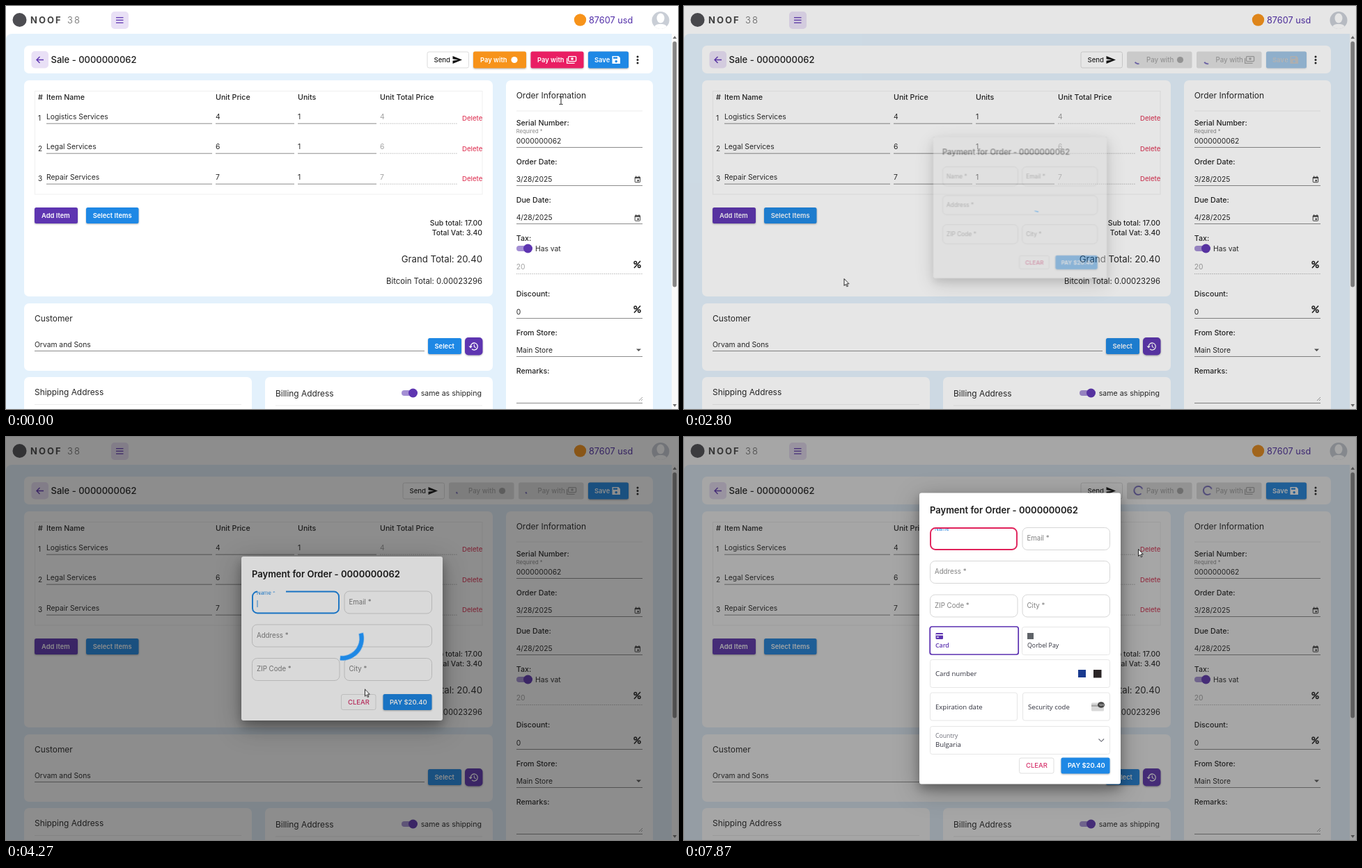
Animation of 965 by 580 pixels, one loop 8 s. Source, as an HTML page:

```html
<!DOCTYPE html>
<html lang="en">
<head>
<meta charset="utf-8">
<title>Sale payment</title>
<style>
:root { --t: 0ms; }
html, body { margin: 0; width: 100%; height: 100%; overflow: hidden; background: #fff; }
svg { display: block; width: 965px; height: 580px; font-family: Inter, sans-serif; }
text { white-space: pre; }
.stripe { font-family: "Open Sans", sans-serif; }
.raised { filter: drop-shadow(0 1px 1px rgba(0,0,0,.3)); }
.modal { filter: drop-shadow(0 7px 7px rgba(0,0,0,.25)) drop-shadow(0 8px 17px rgba(0,0,0,.3)); }
.spin { animation: spin 1.4s linear calc(var(--t) - var(--o)) infinite paused; }
.dash { animation: dash 1.4s ease-in-out calc(var(--t) - var(--o)) infinite paused; }
.save { animation: save 8s linear var(--t) infinite paused; }
.dim { animation: dim 8s linear var(--t) infinite paused; }
.open { animation: open 8s linear var(--t) infinite paused; transform-origin: 482.5px 290px; }
.cursor { animation: move 8s linear var(--t) infinite paused; }
@keyframes spin { to { transform: rotate(360deg); } }
@keyframes dash {
  0% { stroke-dasharray: 1px, 200px; stroke-dashoffset: 0; }
  50% { stroke-dasharray: 100px, 200px; stroke-dashoffset: -15px; }
  100% { stroke-dasharray: 100px, 200px; stroke-dashoffset: -125px; }
}
@keyframes save {
  0%, 13.2% { opacity: 1; }
  13.3%, 33.3% { opacity: 0; }
  38.3%, 100% { opacity: 1; }
}
@keyframes dim {
  0%, 33.3% { opacity: 0; }
  35% { opacity: .28; }
  38.3%, 100% { opacity: 1; }
}
@keyframes open {
  0%, 33.3% { opacity: 0; transform: scale(.8); }
  35% { opacity: .45; transform: scale(.862); }
  38.3%, 100% { opacity: 1; transform: none; }
}
@keyframes move {
  0% { transform: translate(797px, 136px); }
  1.667% { transform: translate(798px, 121.5px); }
  3.333% { transform: translate(786px, 98px); }
  5%, 26.667% { transform: translate(778px, 87px); }
  28.333% { transform: translate(650px, 145px); }
  30% { transform: translate(420px, 245px); }
  31.667% { transform: translate(234px, 323px); }
  33.333% { transform: translate(230px, 385px); }
  35% { transform: translate(229.5px, 392px); }
  38.333%, 46.667% { transform: translate(231px, 394px); }
  51.667% { transform: translate(450px, 383px); }
  55% { transform: translate(580px, 342px); }
  56.667%, 65% { transform: translate(598.5px, 333px); }
  70% { transform: translate(407px, 472px); }
  75% { transform: translate(426px, 549px); }
  76.667%, 78.333% { transform: translate(427.5px, 551px); }
  80% { transform: translate(480px, 499px); }
  85% { transform: translate(612px, 187px); }
  90%, 95% { transform: translate(648px, 154px); }
  96.667%, 100% { transform: translate(652px, 161px); }
}
</style>
</head>
<body>
<svg id="stage" viewBox="0 0 965 580"></svg>
<script>
const INK = '#262626', GREY = '#a2a2a2', BLUE = '#1e88e5', PURPLE = '#5e35b1', PINK = '#e91e63';
const OFF = '#e0e0e0', LINE = '#8c8c8c';

// y is the middle of the text line
const text = (x, y, size, str, fill = INK, weight = 400, more = '') =>
  `<text x="${x}" y="${y + size * .36}" font-size="${size}" fill="${fill}" font-weight="${weight}" ${more}>${str}</text>`;
const endText = (y, size, str, weight) => text(684, y, size, str, INK, weight, 'text-anchor="end"');
const rect = (x, y, w, h, fill, r = 0, more = '') =>
  `<rect x="${x}" y="${y}" width="${w}" height="${h}" rx="${r}" fill="${fill}" ${more}/>`;
const frame = (x, y, w, h, stroke, r = 0, width = 1) =>
  rect(x, y, w, h, 'none', r, `stroke="${stroke}" stroke-width="${width}"`);
const path = (d, stroke, width = 1, fill = 'none', more = '') =>
  `<path d="${d}" stroke="${stroke}" stroke-width="${width}" fill="${fill}" ${more}/>`;
const dot = (x, y, r, fill) => `<circle cx="${x}" cy="${y}" r="${r}" fill="${fill}"/>`;
const rule = (x1, x2, y, color = LINE, more = '') => path(`M${x1} ${y}H${x2}`, color, 1, 'none', more);
const dotted = (x1, x2, y) => rule(x1, x2, y, '#b5b5b5', 'stroke-dasharray="1.4 1.4"');
const during = (from, to, body) => `<g data-from="${from}" data-to="${to}">${body}</g>`;
const button = (x, y, w, h, fill, label, tx, color = '#fff') =>
  rect(x, y, w, h, fill, 2.5, fill === OFF ? '' : 'class="raised"') + text(tx, y + h / 2, 9.4, label, color, fill === OFF ? 500 : 600);
const card = (x, y, w, h) => rect(x, y, w, h, '#fff', 7);

const spinner = (x, y, size, color, width, base, offset) =>
  `<g transform="translate(${x} ${y}) scale(${size / 44}) rotate(${base})" style="--o:${offset}ms">
   <g class="spin"><circle class="dash" r="20" fill="none" stroke="${color}" stroke-width="${width}"/></g></g>`;
const bigSpinner = (x, y, base, offset) => spinner(x, y, 62.2, BLUE, 4.6, base, offset);

const toggle = (x, y, track = '#a48fd4', knob = PURPLE) =>
  rect(x, y - 4, 20, 8, track, 4) + dot(x + 16.5, y, 6.5, knob);
const plane = x => path(`M${x} 72l13.5 5.5-13.5 5.5v-4.2l8-1.3-8-1.3z`, 'none', 0, '#111');
const notes = (x, c) => frame(x + 2.6, 72.6, 11, 7, c, 1, 1.3) + dot(x + 8, 76, 1.8, c) + path(`M${x + .6} 75v7.4h11`, c, 1.3);
const floppy = c => path('M870.5 72h9l2.5 2.5v8.5h-11.5z', 'none', 0, c) +
  rect(872, 73.4, 6, 2.4, c === '#fff' ? BLUE : OFF) + dot(876.2, 79.7, 1.8, c === '#fff' ? BLUE : OFF);
const percent = y => path(`M902 ${y + 5}l9-10`, '#222', 1.6) +
  [[903.8, -2.6], [909.3, 2.6]].map(([x, d]) => `<circle cx="${x}" cy="${y + d}" r="1.8" fill="none" stroke="#222" stroke-width="1.5"/>`).join('');
const calendar = y => frame(903.2, y - 3.2, 7.4, 7.4, '#444', .8) + rect(903, y - 3.5, 8, 2.2, '#444') +
  rect(906.5, y + .5, 2.4, 2.4, '#444') + path(`M904.7 ${y - 5}v2M909 ${y - 5}v2`, '#444');

function header() {
  return rect(0, 0, 965, 580, '#fff') +
    dot(19.5, 20, 10, '#4d4d52') +
    text(35, 20, 13, 'NOOF', '#444', 700, 'letter-spacing="2"') + text(88, 20, 13, '38', '#666', 300, 'letter-spacing="2"') +
    rect(151, 8, 25, 25, '#e9e0f6', 5) + path('M158 16.7h10.5M158 20.4h10.5M158 24.1h10.5', PURPLE, 1.3) +
    dot(824.5, 20, 8.7, '#f7931a') + text(837, 20, 12.7, '87607 usd', '#512da8') +
    `<clipPath id="face"><circle cx="940" cy="20.5" r="12.5"/></clipPath><g clip-path="url(#face)">` +
    rect(927, 8, 26, 26, '#c9ced6') + `<ellipse cx="940" cy="17.5" rx="5.5" ry="7" fill="#fff"/>` +
    path('M930 34c0-6 4-8 10-8s10 2 10 8z', 'none', 0, '#fff') + '</g>';
}

function scrollbar() {
  return rect(956, 40, 9, 540, '#fafafa') + rect(957.3, 51, 5.8, 353.5, '#868686', 2.9) +
    path('M957.5 47l2.8-4 2.8 4z', 'none', 0, '#707070') + path('M957.5 573l2.8 4 2.8-4z', 'none', 0, '#707070');
}

function toolbar() {
  const off = x => rect(x, 65.5, 93.5, 24, OFF, 2.5);
  const label = x => text(x, 77.3, 9.7, 'Pay with', GREY, 500);
  const send = x => frame(x, 66, 59.5, 23, '#dcdcdc', 2.5) + text(x + 9.5, 77.3, 9.6, 'Send', '#222', 500) + plane(x + 36.5);
  return card(26, 57, 903, 40) + rect(36.5, 65, 24.5, 24.5, '#e9e0f6', 5) +
    path('M54 77.5h-10M48.5 73l-4.5 4.5 4.5 4.5', PURPLE, 1.4) +
    text(64.5, 77.3, 13, 'Sale - 0000000062', '#1c1c1c', 500) +
    during(0, 1060, send(605) +
      button(671, 65.5, 76, 24, '#f7931a', 'Pay with', 681) + dot(730, 77.5, 4.6, '#fff') +
      button(753.5, 65.5, 76, 24, PINK, 'Pay with', 763) + notes(805, '#fff')) +
    during(1060, 8000, send(570) + off(636) + off(736) + label(664) + label(763.5) +
      dot(712.5, 77.5, 4.6, GREY) + notes(805, GREY)) +
    [652.5, 752].map(x => during(1060, 2660, spinner(x, 77, 13.5, '#5447a8', 5, -150, 560)) +
      during(2660, 8000, spinner(x, 77, 13.5, '#5447a8', 5, -160, 1176))).join('') +
    rect(836, 65.5, 58, 24, OFF, 2.5) + text(845, 77.3, 9.4, 'Save', GREY, 500) + floppy(GREY) +
    `<g class="save">${button(836, 65.5, 58, 24, BLUE, 'Save', 845)}${floppy('#fff')}</g>` +
    [73, 77.5, 82].map(y => dot(907, y, 1.5, '#222')).join('');
}

function items() {
  const rows = [['Logistics Services', 4], ['Legal Services', 6], ['Repair Services', 7]];
  const head = [[46, '#'], [58, 'Item Name'], [301, 'Unit Price'], [419, 'Units'], [537, 'Unit Total Price']];
  return card(26, 107, 673, 311) + frame(41.5, 122.5, 642.5, 148.5, '#f0f0f0') +
    head.map(([x, s]) => text(x, 131.5, 10.7, s, '#222', 450)).join('') +
    rows.map(([name, price], i) => {
      const y = 159 + i * 43.4, u = Math.round(y + 10) + .2;
      return text(46, y + 2.5, 10, i + 1) + text(58, y, 10.3, name) + text(301, y, 10.3, price) + text(419, y, 10.3, 1) +
        text(537, y, 10.3, price, GREY) + rule(58, 296, u) + rule(301, 414, u) + rule(419, 532, u) + dotted(537, 649, u) +
        text(655, y + 3, 9.6, 'Delete', '#e0405f', 450);
    }).join('') +
    button(41, 290, 62, 23, PURPLE, 'Add Item', 51) + button(115, 290, 75.5, 23, BLUE, 'Select Items', 124.7) +
    endText(312, 10.4, 'Sub total: 17.00', 450) + endText(326.5, 10.4, 'Total Vat: 3.40', 450) +
    endText(364.5, 13.2, 'Grand Total: 20.40') + endText(396, 11.3, 'Bitcoin Total: 0.00023296');
}

function customer() {
  return card(26, 428, 673, 97) + text(41, 449.5, 11.9, 'Customer') +
    text(41, 487, 10.3, 'Orvam and Sons') + rule(41, 601, 496.5) +
    button(606, 478, 48, 23, BLUE, 'Select', 615.5) +
    rect(659, 477, 25.5, 25.5, PURPLE, 5, 'class="raised"') +
    path('M667.3 490a5 5 0 1 1 1.7 3.8', '#fff', 1.3) + path('M664.5 489.5h5.4l-2.7 3z', 'none', 0, '#fff') +
    path('M672.3 487v3.3l2.3 1.5', '#fff', 1.1) +
    card(26, 534, 327, 60) + text(41, 556, 11.9, 'Shipping Address') + rule(41, 338, 573.5, '#ececec') +
    card(372, 534, 327, 60) + text(387, 557.5, 11.9, 'Billing Address') + rule(387, 684, 575, '#ececec') +
    toggle(568, 557) + text(595.7, 556.7, 10.6, 'same as shipping') +
    during(1060, 1330, button(41, 290, 62, 23, OFF, 'Add Item', 51, GREY) +
      button(115, 290, 75.5, 23, OFF, 'Select Items', 124.7, GREY) +
      button(606, 478, 48, 23, OFF, 'Select', 615.5, GREY) + toggle(568, 557, '#d0d0d0', '#eee') + toggle(733, 349, '#d0d0d0', '#eee'));
}

function order() {
  const labels = [['Serial Number:', 168.5], ['Order Date:', 224], ['Due Date:', 279], ['Tax:', 334.5],
    ['Discount:', 414.5], ['From Store:', 470], ['Remarks:', 525]];
  const values = [['0000000062', 194], ['3/28/2025', 249], ['4/28/2025', 304], ['0', 440], ['Main Store', 495]];
  return card(718, 107, 211, 490) + text(732.7, 128.5, 12, 'Order Information') + rule(733, 914, 151, '#ececec') +
    labels.map(([s, y]) => text(732.7, y, 10.7, s, '#222', 450)).join('') +
    values.map(([s, y]) => text(732.7, y, 10.3, s) + rule(733, 914, Math.round(y + 9) + .5)).join('') +
    text(732.7, 180, 7.6, 'Required *', '#888') + calendar(249.5) + calendar(305) +
    toggle(733, 349) + text(760, 349, 10.3, 'Has vat') + text(732.7, 375, 10.3, '20', GREY) + dotted(733, 914, 385.5) +
    percent(372) + percent(436.5) + path('M905 493.5h7l-3.5 3.5z', 'none', 0, '#555') +
    rule(733, 914, 571.5) + path('M909 568l5-5M912 568l2-2', '#888', .8);
}

const field = (x, y, w, label) => frame(x, y, w, 32, '#d2d2d2', 7, .9) + text(x + 6.5, y + 15.5, 9.7, label, '#808080');
const floating = y => `<svg x="355" y="${y}" width="60" height="12" viewBox="355 ${y} 60 12">${text(360, y + 1.5, 7.5, 'Name *', BLUE)}</svg>`;
const focused = y => path(`M361 ${y}a7 7 0 0 0-7 7v17a7 7 0 0 0 7 7h110a7 7 0 0 0 7-7v-17a7 7 0 0 0-7-7H402`, BLUE, 1.9) + floating(y);
const failed = y => floating(y) + frame(354, y, 124, 31, '#e0215a', 7, 1.9);

function dialog(top, height, name, body = '', clear = '#d6336c') {
  const end = top + height;
  return rect(338, top, 289, height, '#fff', 3, 'class="modal"') +
    text(353, top + 25, 13, 'Payment for Order - 0000000062', '#1c1c1c', 600) +
    name + field(486, top + 50, 125.5, 'Email *') + field(353.5, top + 98, 258, 'Address *') +
    field(353.5, top + 146.5, 125.5, 'ZIP Code *') + field(486, top + 146.5, 125.5, 'City *') + body +
    frame(481.5, end - 37.5, 49.5, 22, '#dedede', 2.5) + text(491, end - 26.5, 9.5, 'CLEAR', clear, 450) +
    button(541.5, end - 38, 70, 23, BLUE, 'PAY $20.40', 551);
}

function skeleton() {
  const box = (x, y, w) => frame(x, y, w, 40, '#e6e6e6', 3);
  const bar = (x, y, w) => rect(x, y, w, 9.5, '#f3f3f4', 4);
  return box(353.5, 293, 126.5) + box(485.5, 293, 126) + box(353.5, 340.5, 258) + box(353.5, 388.5, 125) + box(486.5, 388.5, 125) +
    bar(361.5, 301.5, 14) + bar(361.5, 314.5, 44) + bar(493, 301.5, 14) + bar(493, 314.5, 44) +
    bar(361.5, 355, 36) + bar(361.5, 403.5, 20) + bar(494, 403.5, 14);
}

function payForm() {
  const box = (x, y, w, h = 40) => frame(x, y, w, h, '#e6e6e6', 3);
  const dark = '#30313d';
  return `<g class="stripe">` + frame(353.2, 273, 127, 40, '#5a2fb0', 3, 1.7) + box(485.5, 273.5, 126) +
    box(353.5, 320.5, 258) + box(353.5, 368, 125) + box(486.5, 368, 125) + box(353.5, 416.5, 258) +
    rect(361.5, 282, 10.5, 9, PURPLE, 1.2) + rect(361.5, 284, 10.5, 1.6, '#fff') + rect(363, 287.5, 3, 1.2, '#fff') +
    text(361, 299.5, 8.8, 'Card', PURPLE, 600) +
    rect(493, 282, 9, 9, '#5f6368') + text(493, 299.5, 8.8, 'Qorbel Pay', dark) +
    text(361, 340.5, 9.6, 'Card number', dark) + rect(566, 335, 11, 11, '#1a3a8f') + rect(588, 335, 11.5, 11.5, '#2b2526') +
    text(361, 388.5, 9.6, 'Expiration date', dark) + text(494, 388.5, 9.6, 'Security code', dark) +
    rect(585, 382.5, 18, 12, '#d8d8d8', 1.5) + rect(585, 385.5, 18, 2.5, '#aaa') +
    `<ellipse cx="599" cy="385.5" rx="5" ry="4.3" fill="#444"/>` + text(596, 385.5, 4, '123', '#fff', 600) +
    text(361, 430, 8.7, 'Country', '#6d6e78') + text(361, 443, 9.6, 'Bulgaria', dark) +
    path('M595.5 434.5l3.8 3.8 3.8-3.8', '#6d6e78', 1.1) + '</g>';
}

const caret = y => `<g data-caret>${path(`M361 ${y}v10`, BLUE, .9)}</g>`;
const active = top => focused(top + 50.5) + caret(top + 63);
const shade = (x, y, w, h) => rect(x, y, w, h, '#000', 0, 'opacity=".15"');

function cursor() {
  const ibeam = path('M-2.5-5.5h2l.5.8.5-.8h2M0-4.7v9.4M-2.5 5.5h2l.5-.8.5.8h2', '#222', 1);
  const arrow = path('M.5.5v10l2.3-2.1 1.6 3.5 1.5-.7-1.6-3.4h3z', '#111', .9, '#fff');
  const hand = path('M-1.5 7V1.3a1.2 1.2 0 0 1 2.4 0V5l5 1c1 .3 1 1 1 2l-.9 3.5h-5.5L-3.5 8c-.6-1 .5-1.8 2-.3z', '#111', .9, '#fff');
  return `<g class="cursor">` + during(0, 260, ibeam) + during(260, 390, arrow) + during(390, 1060, hand) + during(1060, 8000, arrow) + '</g>';
}

// The loading shade stays inside the dialog while it opens, then covers the page.
const stage = document.getElementById('stage');
stage.innerHTML = header() + scrollbar() + path('M0 580V48a8 8 0 0 1 8-8h948v540z', 'none', 0, '#e3f1fc') +
  toolbar() + items() + customer() + order() +
  during(1190, 2660, bigSpinner(362.5, 262.5, -146, 630)) +
  `<g class="dim">${rect(0, 0, 965, 580, '#212121', 0, 'opacity=".4"')}</g>` +
  during(2660, 4530, `<g class="open">` +
    dialog(172, 236, during(2660, 2930, field(353.5, 222, 125.5, 'Name *')) + during(2930, 4530, active(172))) +
    during(2660, 2930, shade(338, 172, 289, 236) + bigSpinner(482.5, 290, 5, 25)) + '</g>') +
  during(2930, 4530, shade(0, 0, 965, 580) + bigSpinner(482.5, 290, -109, 234)) +
  during(4530, 4930, dialog(100.5, 379, active(100.5), skeleton(), '#7b3b4a')) +
  during(4930, 8000, dialog(80.5, 419, during(4930, 7730, active(80.5)) + during(7730, 8000, failed(131)), payForm())) +
  cursor();

// The clock advances 60 times per 8 s loop; keyframes are read at that time.
const LOOP = 8000, STEP = LOOP / 60;
const timed = [...stage.querySelectorAll('[data-from]')];
const carets = [...stage.querySelectorAll('[data-caret]')];
const start = performance.now();
let last = -1;

function tick() {
  const step = Math.floor(((performance.now() - start) % LOOP + 4) / STEP) % 60;
  if (step !== last) {
    last = step;
    const t = step * STEP;
    document.documentElement.style.setProperty('--t', -t + 'ms');
    for (const el of timed) el.style.display = t >= +el.dataset.from && t < +el.dataset.to ? '' : 'none';
    const lit = t < 3120 || (t + 880) % 1000 < 500;
    for (const el of carets) el.style.display = lit ? '' : 'none';
  }
  requestAnimationFrame(tick);
}
tick();
</script>
</body>
</html>
```
